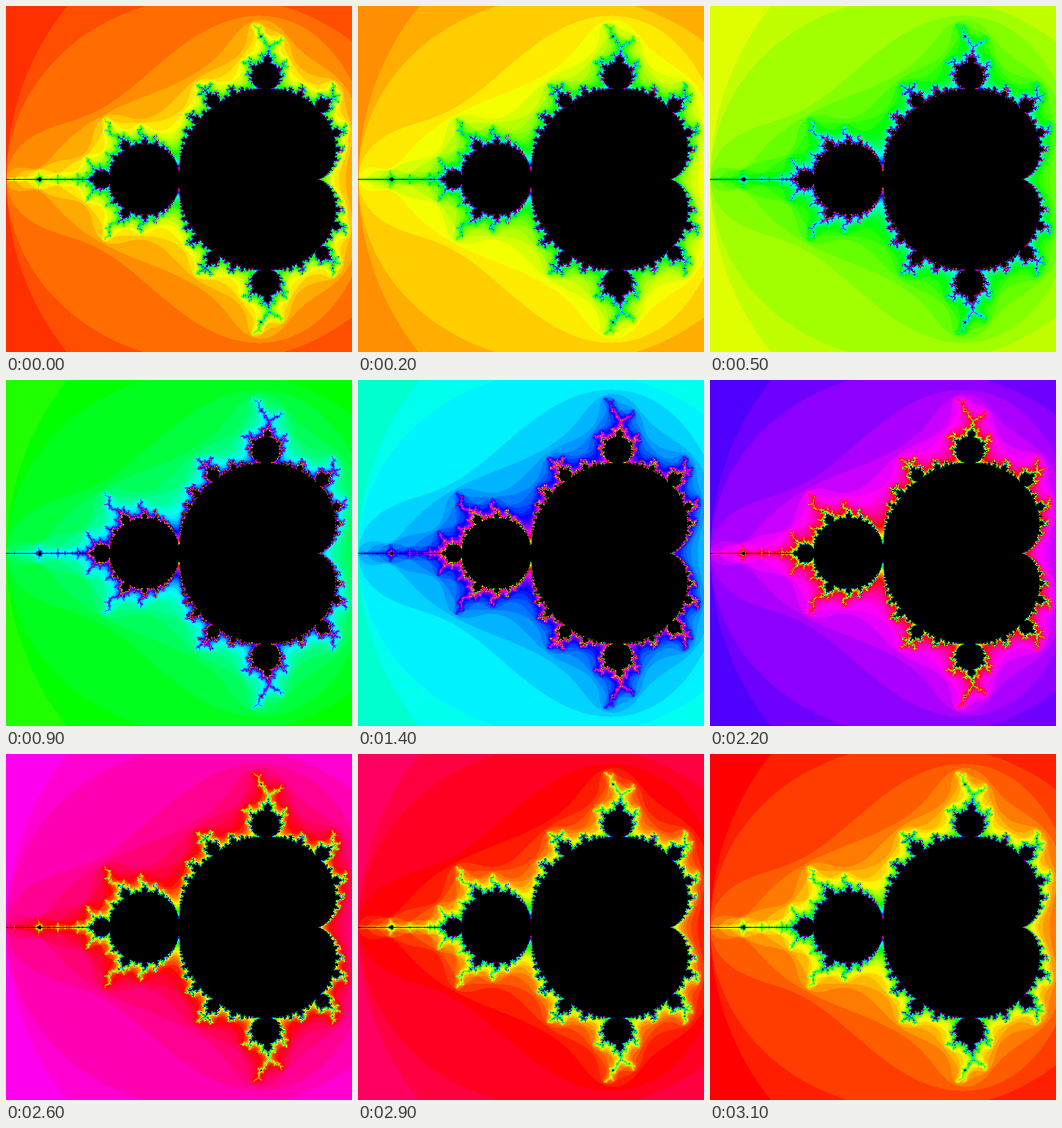
An HTML page with a canvas that plays this animation: 512x512 px, repeating every 3200 ms.

```html
<!DOCTYPE html>
<html lang="en">
<head>
<meta charset="utf-8">
<title>Mandelbrot colour cycle</title>
<style>
  html, body { margin: 0; width: 100%; height: 100%; overflow: hidden; background: #000; }
  canvas { display: block; width: 100%; height: 100%; image-rendering: pixelated; }
</style>
</head>
<body>
<canvas id="stage" width="512" height="512"></canvas>
<script>
const SIZE = 512, SPAN = 2.5, LEFT = -2, TOP = -1.25;
const MAX_ITER = 50, STEPS = 32, STEP_MS = 100;

const ctx = document.getElementById('stage').getContext('2d');
const image = ctx.createImageData(SIZE, SIZE);
const pixels = new Uint32Array(image.data.buffer);

// Completed iterations before the orbit leaves the radius-2 disc.
function escapeCount(cx, cy) {
  let x = 0, y = 0;
  for (let n = 0; n < MAX_ITER; n++) {
    [x, y] = [x * x - y * y + cx, 2 * x * y + cy];
    if (x * x + y * y > 4) return n;
  }
  return MAX_ITER;
}

const counts = Uint8Array.from({ length: SIZE * SIZE }, (_, i) =>
  escapeCount(LEFT + SPAN * (i % SIZE) / SIZE, TOP + SPAN * Math.floor(i / SIZE) / SIZE));

// Fully saturated hue (in turns) packed as ABGR.
function hueColor(turns) {
  const channel = shift => {
    const h = (turns * 6 + shift) % 6;
    return Math.round(255 * Math.min(1, Math.max(0, Math.abs(h - 3) - 1)));
  };
  return (255 << 24 | channel(2) << 16 | channel(4) << 8 | channel(0)) >>> 0;
}

function draw(step) {
  const palette = Uint32Array.from({ length: MAX_ITER + 1 }, (_, n) =>
    n < MAX_ITER ? hueColor(n / MAX_ITER + (step + 1) / STEPS) : 0xff000000);
  for (let i = 0; i < pixels.length; i++) pixels[i] = palette[counts[i]];
  ctx.putImageData(image, 0, 0);
}

let shown = -1;
function tick() {
  const step = Math.floor(performance.now() / STEP_MS) % STEPS;
  if (step !== shown) draw(shown = step);
  requestAnimationFrame(tick);
}
tick();
</script>
</body>
</html>
```
